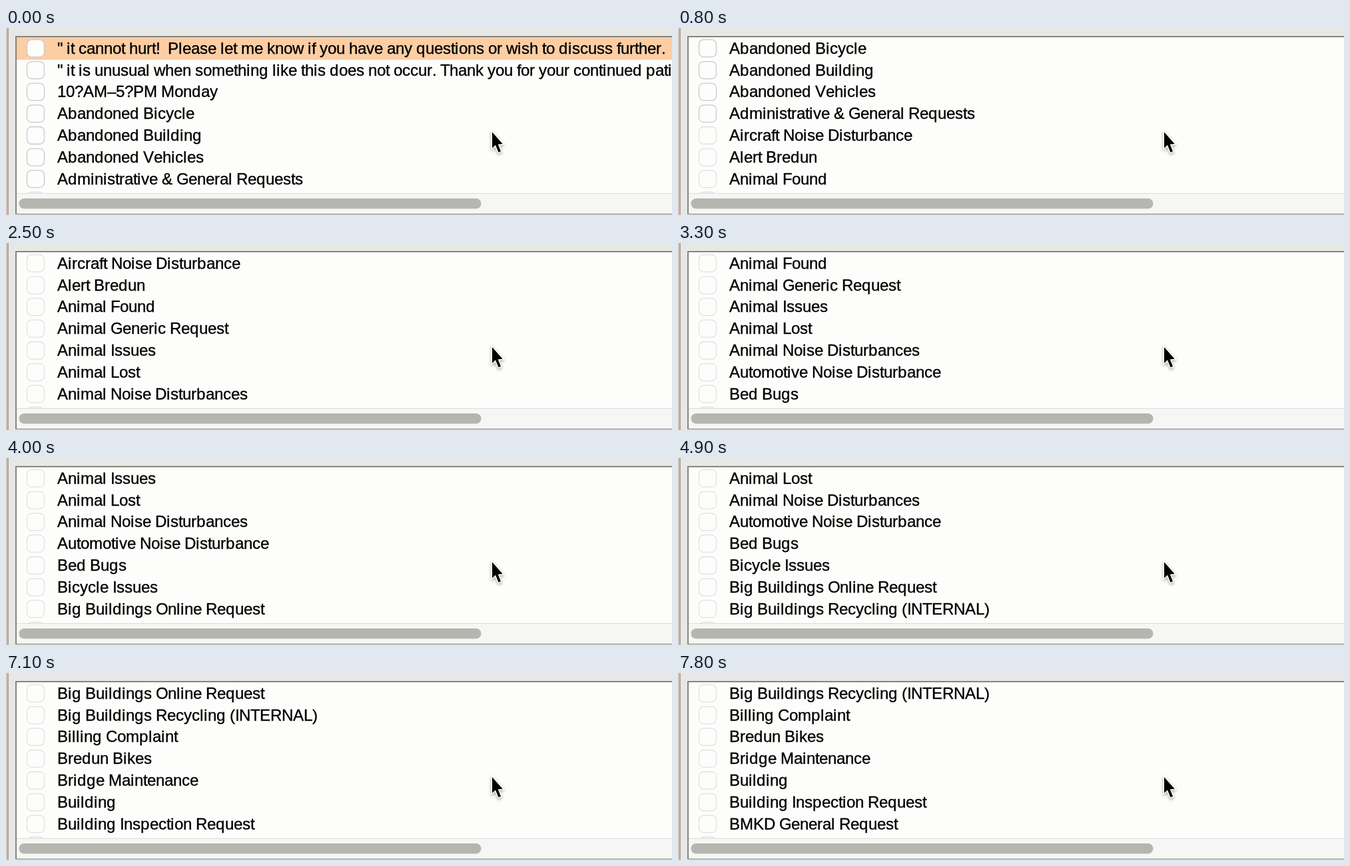
Write an HTML page with a canvas that moves like this. It is 1000 px wide and 282 px high and loops after 8000 ms.

```html
<!DOCTYPE html>
<html lang="en">
<head>
<meta charset="utf-8">
<title>Request type list</title>
<style>
  html, body { margin: 0; width: 100%; height: 100%; overflow: hidden; background: #e7e7e5; }
  canvas { display: block; width: 1000px; height: 282px; }
</style>
</head>
<body>
<canvas id="stage" width="1000" height="282"></canvas>
<script>
const ctx = document.getElementById("stage").getContext("2d");
const LOOP = 8000;
const PITCH = 32.83;
const FIRST_ROW = 30.7;
const LAST_GREY = 6;
const PAPER = "#fdfdfb";

const items = [
  '" it cannot hurt!  Please let me know if you have any questions or wish to discuss further.',
  '" it is unusual when something like this does not occur. Thank you for your continued patience.',
  "10?AM–5?PM Monday",
  "Abandoned Bicycle",
  "Abandoned Building",
  "Abandoned Vehicles",
  "Administrative & General Requests",
  "Aircraft Noise Disturbance",
  "Alert Bredun",
  "Animal Found",
  "Animal Generic Request",
  "Animal Issues",
  "Animal Lost",
  "Animal Noise Disturbances",
  "Automotive Noise Disturbance",
  "Bed Bugs",
  "Bicycle Issues",
  "Big Buildings Online Request",
  "Big Buildings Recycling (INTERNAL)",
  "Billing Complaint",
  "Bredun Bikes",
  "Bridge Maintenance",
  "Building",
  "Building Inspection Request",
  "BMKD General Request"
];

// Each wheel click moves the list by one row.
const clicks = [100, 400, 700, 1000, 1700, 2000, 2300, 3000, 3300,
  3600, 3900, 4900, 5400, 5800, 6100, 6400, 7100, 7500];

function rect(x, y, w, h, color) {
  ctx.fillStyle = color;
  ctx.fillRect(x, y, w, h);
}

function roundBox(x, y, w, h, r) {
  ctx.beginPath();
  ctx.roundRect(x, y, w, h, r);
}

function drawPanel() {
  rect(0, 0, 1000, 282, "#e7e7e5");
  rect(0, 0, 2, 282, "#cfc4bc");
  rect(2, 0, 2, 282, "#b5a299");
  rect(14, 12, 986, 269, "#85857c");
  rect(16, 14, 984, 266, PAPER);
}

function drawCheckbox(cy, grey) {
  roundBox(31.5, cy - 13, 26, 26, 7);
  ctx.fillStyle = PAPER;
  ctx.fill();
  ctx.lineWidth = 1.3;
  ctx.strokeStyle = grey ? "#c9c9d3" : "#e1e1e5";
  ctx.stroke();
}

// Hinted type: whole-pixel advances, with round-and-stem letters one pixel wider.
function advance(letter) {
  const width = Math.floor(ctx.measureText(letter).width + 0.1);
  return Math.max(6, width) + ("bdgpq".includes(letter) ? 1 : 0);
}

function drawText(text, x, y) {
  for (const letter of text) {
    ctx.fillText(letter, x, y);
    ctx.strokeText(letter, x, y);
    x += advance(letter);
  }
}

function drawRows(top) {
  ctx.save();
  ctx.beginPath();
  ctx.rect(16, 14, 984, 235);
  ctx.clip();
  ctx.font = '24px "Liberation Sans", Arial, sans-serif';
  for (let row = 0; row < 8; row++) {
    const index = top + row;
    const cy = FIRST_ROW + row * PITCH;
    if (index === 0) rect(16, 14, 984, 34, "#fdcea4");
    drawCheckbox(cy, index <= LAST_GREY);
    if (row < 7) {
      ctx.fillStyle = ctx.strokeStyle = "#000";
      ctx.lineWidth = 0.35;
      drawText(items[index], 77, Math.round(cy + 8));
    }
  }
  ctx.restore();
}

function drawScrollbar() {
  rect(16, 249, 984, 31, "#f6f6f4");
  rect(16, 249, 984, 1, "#dcdce0");
  roundBox(19.5, 257, 694, 15.5, 7.75);
  ctx.fillStyle = "#b6b6b0";
  ctx.fill();
}

function drawPointer() {
  ctx.beginPath();
  ctx.moveTo(730, 157);
  for (const [x, y] of [[730, 181], [735, 176.5], [739.5, 187.5], [743, 186],
    [738.7, 175.5], [745.7, 174.8]]) ctx.lineTo(x, y);
  ctx.closePath();
  ctx.save();
  ctx.shadowColor = "rgba(0, 0, 0, 0.35)";
  ctx.shadowBlur = 4;
  ctx.shadowOffsetY = 2;
  ctx.lineWidth = 3;
  ctx.strokeStyle = PAPER;
  ctx.stroke();
  ctx.restore();
  ctx.fillStyle = "#000";
  ctx.fill();
}

function draw(time) {
  const top = clicks.filter(click => click <= time).length;
  drawPanel();
  drawRows(top);
  drawScrollbar();
  drawPointer();
}

const start = performance.now();
function tick() {
  draw((performance.now() - start) % LOOP);
  requestAnimationFrame(tick);
}
tick();
</script>
</body>
</html>
```
